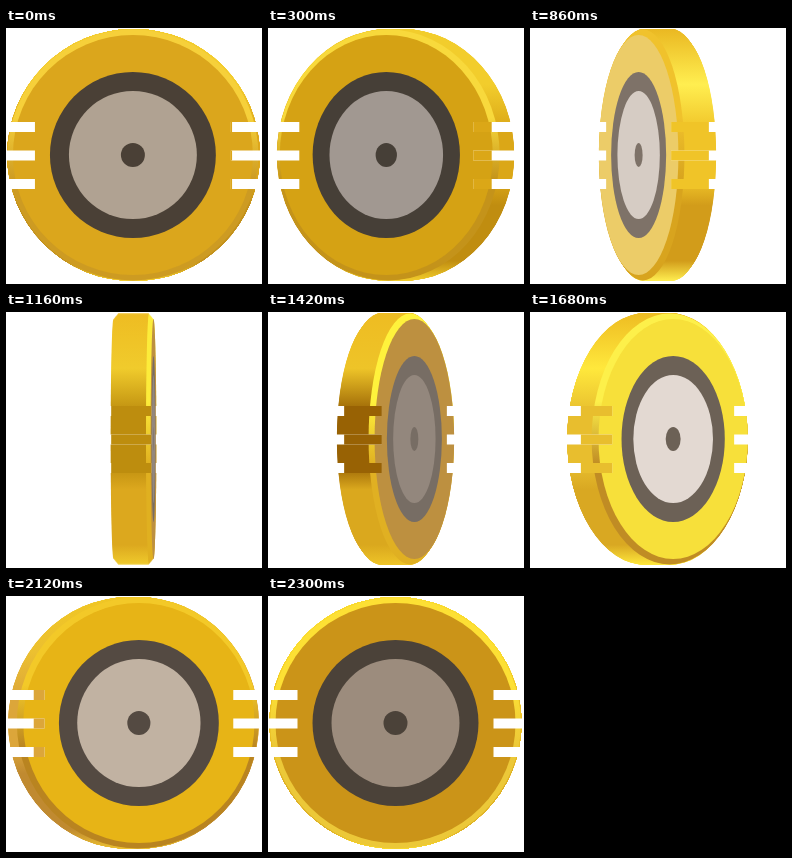
Write an HTML page with a canvas that moves like this. It is 256x256 px and loops after 2.32 s.

```html
<!DOCTYPE html>
<html lang="en">
<head>
<meta charset="utf-8">
<title>Spinning coin</title>
<style>
  html, body { margin: 0; height: 100%; overflow: hidden; background: #fff; }
  canvas { display: block; }
</style>
</head>
<body>
<canvas id="stage" width="256" height="256"></canvas>
<script>
const ctx = document.getElementById('stage').getContext('2d');
const LOOP = 2320, STEP = 20, CX = 127.5, CY = 127;
const HALF_DEPTH = 20, RIM_DEPTH = 15, FACE_R = 120, RIM_R = 126;

// time, face, ring, plate, rim top / highlight / middle / bottom, bevel top / bottom
const LIGHT = [
  [0,    'dba61c 4a4036 b0a292 f2cb2c f2cb2c dca61a c2901a f6d03a cd9b22'],
  [300,  'd5a214 463f37 a19891 f2cd2c f2cd2c dba717 c08d10 f8d93c c4931a'],
  [860,  'eccc68 7e7268 d6ccc4 eab822 ffee50 f0c428 d29c1a f0c22c d8a41e'],
  [1138, 'eccc68 7e7268 d6ccc4 eab822 f6d83a dcac20 dca81c f6d034 dca820'],
  [1142, 'bd9040 776d64 93877d eebc22 f0cc2c c0900f dca81e fcec3a e0b020'],
  [1420, 'bd9040 776d64 93877d eebc22 eec428 986204 daa81e fff23c e0b022'],
  [1680, 'f7e03a 6c6156 e3d9d2 eebc22 ffe83c e8be2e d9a822 fdf04a c08c24'],
  [2120, 'e7b416 544a42 c1b2a2 f0c624 ecc030 dca63a c08a30 f3c928 b98420'],
  [2300, 'cb9418 4b4239 9c8c7d f8d82c f8d82c e8bc22 dcae22 fde034 ecc838'],
  [2320, 'dba61c 4a4036 b0a292 f2cb2c f2cb2c dca61a c2901a f6d03a cd9b22']
].map(([time, colors]) => ({
  time,
  colors: colors.split(' ').map(hex => hex.match(/../g).map(v => parseInt(v, 16)))
}));

function lightAt(t) {
  const i = LIGHT.findIndex(key => key.time > t);
  const a = LIGHT[i - 1], b = LIGHT[i];
  const k = (t - a.time) / (b.time - a.time);
  return a.colors.map((rgb, n) =>
    `rgb(${rgb.map((v, j) => Math.round(v + (b.colors[n][j] - v) * k)).join()})`);
}

function gradient(...stops) {
  const g = ctx.createLinearGradient(0, 1, 0, 253);
  stops.forEach(([at, color]) => g.addColorStop(at, color));
  return g;
}

function disc(x, r, squash, fill) {
  ctx.fillStyle = fill;
  ctx.beginPath();
  ctx.ellipse(x, CY, r * squash, r, 0, 0, Math.PI * 2);
  ctx.fill();
}

function bar(from, to, y, fill) {
  ctx.fillStyle = fill;
  ctx.fillRect(from, y, to - from, 10);
}

function draw(t) {
  const turn = (t + 20) / LOOP * Math.PI;
  const angle = turn + 0.06 * Math.sin(2 * turn);
  const squash = Math.abs(Math.cos(angle));
  const lean = Math.sin(angle) * (Math.cos(angle) > 0 ? -1 : 1);
  const [face, ring, plate, top, highlight, middle, bottom, bevelTop, bevelBottom] = lightAt(t);
  const rim = gradient([0, top], [.22, highlight], [.4, middle], [.6, middle],
    [.7, bottom], [.92, bottom], [1, highlight]);
  const bevel = gradient([0, bevelTop], [.35, bevelTop], [.6, bevelBottom], [1, bevelBottom]);

  ctx.fillStyle = '#fff';
  ctx.fillRect(0, 0, 256, 256);

  // Body, stacked from the back to the front
  for (let z = -HALF_DEPTH; z <= HALF_DEPTH; z += .5) {
    const slope = Math.max(0, Math.abs(z) - RIM_DEPTH) / (HALF_DEPTH - RIM_DEPTH);
    disc(CX + z * lean, RIM_R + (FACE_R - RIM_R) * slope, squash, z > RIM_DEPTH ? bevel : rim);
  }

  const front = CX + HALF_DEPTH * lean;
  const back = CX - HALF_DEPTH * lean;
  disc(front, FACE_R, squash, face);
  disc(front, 83, squash, ring);
  disc(front, 64, squash, plate);
  disc(front, 12, squash, ring);

  // Slots cut into both sides; their floor shows on the side of the rim
  const reach = 98 * squash;
  const left = front - reach, right = front + reach;
  for (const y of [94, 122.5, 151]) {
    bar(0, left, y, '#fff');
    bar(right, 256, y, '#fff');
    if (lean < 0) bar(right, back + reach, y, middle);
    else bar(back - reach, left, y, middle);
  }
}

function tick() {
  draw(Math.floor(performance.now() % LOOP / STEP) * STEP);
  requestAnimationFrame(tick);
}
tick();
</script>
</body>
</html>
```
